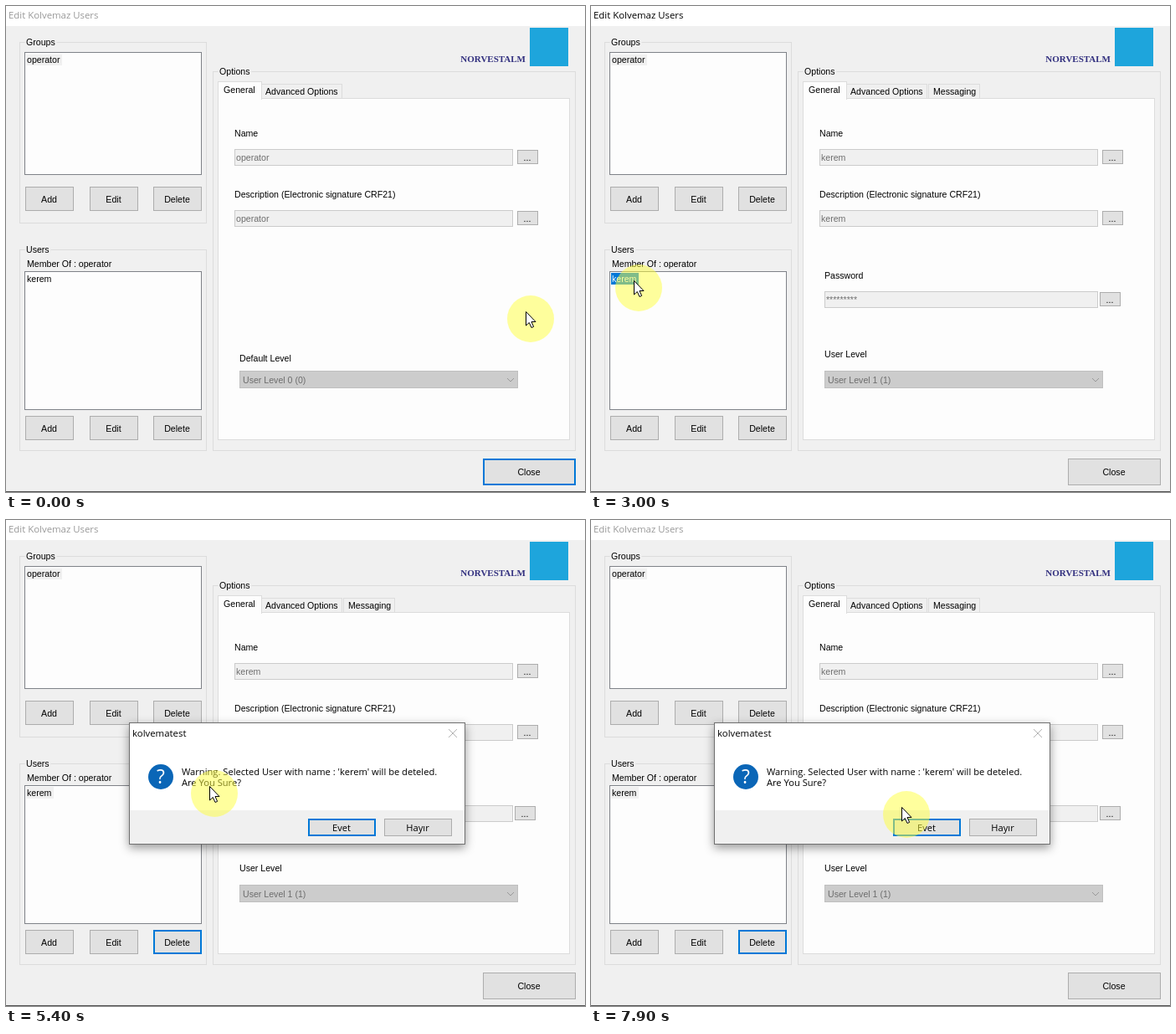
An HTML page that plays this animation: 692x581 px, repeating every 8 s.

```html
<!DOCTYPE html>
<html lang="en">
<head>
<meta charset="utf-8">
<title>Edit Users</title>
<style>
html, body { margin: 0; width: 100%; height: 100%; overflow: hidden; background: #f0f0f0; }
svg { display: block; font: 10.6px "Liberation Sans", Arial, sans-serif; }
text { white-space: pre; }
.ui { font: 11.15px "Open Sans", "Noto Sans", sans-serif; }
.caption { font-size: 11.4px; }
.icon { font-size: 23px; }
.legend { paint-order: stroke; stroke: #f0f0f0; stroke-width: 4px; }
#brand { font: bold 11px "Liberation Serif", serif; }
#dialog { filter: drop-shadow(0 4px 6px rgba(0, 0, 0, .4)); transform-origin: 348px 315px; }
</style>
</head>
<body>
<svg id="stage" width="692" height="581" viewBox="0 0 692 581"></svg>
<script>
const LOOP = 8000, STEP = 100;
const SELECT = 2500, PRESS = 4500, OPEN = 4700;
const BLUE = '#0078d7', GRAY = '#6d6d6d', FACE = '#f0f0f0', WHITE = '#fdfdfd', LINE = '#dcdcdc';
const USER = 'kerem';

// Pointer moves: eased from the last stop to (x, y), with a vertical bulge
const home = { x: 627, y: 374 };
const moves = [
  { from: 700, to: 1600, x: 115, y: 345, bulge: -102 },
  { from: 1600, to: 2100, x: 57, y: 337, bulge: 15 },
  { from: 3000, to: 3700, x: 198, y: 417, bulge: -6 },
  { from: 3700, to: 4300, x: 211, y: 510, bulge: 0 },
  { from: 4900, to: 5400, x: 249, y: 327, bulge: 0 },
  { from: 5400, to: 6500, x: 494, y: 305, bulge: -14 },
  { from: 6500, to: 7100, x: 231, y: 334, bulge: 0 },
  { from: 7100, to: 7500, x: 322, y: 338, bulge: 0 },
  { from: 7700, to: 7900, x: 377, y: 352, bulge: 0 }
];

const fill = (x, y, w, h, color, attrs = '') =>
  `<rect x="${x}" y="${y}" width="${w}" height="${h}" fill="${color}" ${attrs}/>`;
// The border lies inside the box.
const box = (x, y, w, h, color, stroke, line = 1) =>
  fill(x + line / 2, y + line / 2, w - line, h - line, color, `stroke="${stroke}" stroke-width="${line}"`);
const text = (x, y, s, color = '#000', attrs = '') => `<text x="${x}" y="${y}" fill="${color}" ${attrs}>${s}</text>`;
const group = (id, ...parts) => `<g id="${id}">${parts.join('')}</g>`;

const button = (x, y, w, h, label, focus, attrs = '') =>
  box(x, y, w, h, '#e1e1e1', focus ? BLUE : '#adadad', focus ? 2 : 1) +
  text(x + w / 2 - .5, Math.round(y + h / 2 + 4), label, '#000', `text-anchor="middle" ${attrs}`);
const rowButton = (i, y, label, focus) => button(Math.round(23 + i * 76.5), y, 58, 29, label, focus);
const frame = (x, y, w, h, label) =>
  box(x, y, w, h, 'none', LINE) + text(x + 8, y + 4, label, '#000', 'class="legend"');
const listPanel = (y, h, label, listY, listH, rowY) =>
  frame(16, y, 224, h, label) + box(22, listY, 212, listH, WHITE, '#7f8288') +
  ['Add', 'Edit', 'Delete'].map((s, i) => rowButton(i, rowY, s)).join('');
const tab = (x, w, label) => box(x, 93, w, 18, FACE, LINE) + text(x + 6, 106, label);
const entry = (x, y, label, value, moreX = 611) =>
  text(x, y, label) + box(x, y + 15, 606 - x, 20, FACE, '#cbcbcb') +
  text(x + 2, y + 29, value, GRAY) + button(moreX, y + 16, 25, 17, '...');
const level = (y, label, n) =>
  text(279, y, label) + box(279, 436, 333, 21, '#ccc', '#bfbfbf') +
  text(283, 451, `User Level ${n} (${n})`, GRAY) + '<path d="M599 445l4 4 4-4" fill="none" stroke="#999"/>';
const identity = name =>
  entry(273, 156, 'Name', name) + entry(273, 229, 'Description (Electronic signature CRF21)', name);

document.getElementById('stage').innerHTML = [
  fill(0, 0, 692, 581, FACE), fill(0, 0, 692, 24, '#fff'),
  text(3, 15, 'Edit Kolvemaz Users', '#999', 'id="title" class="ui caption"'),
  fill(626, 26, 46, 46, '#1ea5dc'),
  text(621, 67, 'NORVESTALM', '#32307f', 'id="brand" text-anchor="end"'),

  listPanel(43, 217, 'Groups', 55, 147, 216),
  fill(24, 58, 43, 13, FACE), text(25, 68, 'operator'),
  listPanel(291, 241, 'Users', 317, 166, 490),
  text(25, 312, 'Member Of : operator'),
  fill(24, 319, 33, 14, WHITE, 'id="mark"'), text(25, 330, USER, '#000', 'id="item"'),
  group('focusDelete', rowButton(2, 490, 'Delete', true)),

  frame(247, 78, 434, 454, 'Options'),
  tab(304, 98, 'Advanced Options'), group('messaging', tab(403, 62, 'Messaging')),
  box(253, 110, 421, 409, WHITE, LINE),
  box(253, 90, 53, 22, WHITE, LINE), fill(254, 109, 51, 4, WHITE), text(260, 104, 'General'),
  group('groupView', identity('operator'), level(425, 'Default Level', 0)),
  group('userView', identity(USER), entry(279, 326, 'Password', '*********', 608), level(420, 'User Level', 1)),
  button(570, 541, 111, 32, 'Close'),
  group('focusClose', button(570, 541, 111, 32, 'Close', true)),
  fill(0, 580, 692, 1, '#555'),

  group('dialog',
    box(147, 242, 402, 146, '#fff', '#707070'), fill(148, 347, 400, 40, FACE),
    text(151, 259, 'kolvematest', '#000', 'class="ui caption"'),
    '<path d="M529 250l10 10m0-10l-10 10" stroke="#b4b4b4"/>',
    '<circle cx="185" cy="307" r="15" fill="#0a66b7"/>',
    text(185, 315, '?', '#fff', 'class="ui icon" text-anchor="middle"'),
    text(210, 305, `Warning. Selected User with name : '${USER}' will be deteled.`, '#000', 'class="ui"'),
    text(210, 318, 'Are You Sure?', '#000', 'class="ui"'),
    button(361, 357, 81, 21, 'Evet', true, 'class="ui"'),
    button(452, 357, 81, 21, 'Hayır', false, 'class="ui"')),

  group('pointer',
    '<circle r="28" fill="#ffff3c" fill-opacity=".5"/>',
    '<circle id="ring" cx="-6" cy="-9" fill="none" stroke="#785a28" stroke-width="3"/>',
    '<path d="M-5.5-8.5v16.5l3.8-3.5 2.7 6 2.6-1.1-2.6-5.9h5z" fill="#fff" stroke="#000"/>')
].join('');

const el = id => document.getElementById(id);
const show = (id, on) => el(id).style.display = on ? '' : 'none';
const clamp = k => Math.max(0, Math.min(1, k));
const ease = k => k * k * (3 - 2 * k);

function pointerAt(t) {
  let { x, y } = home;
  for (const m of moves) {
    const k = ease(clamp((t - m.from) / (m.to - m.from)));
    x += (m.x - x) * k;
    y += (m.y - y) * k + m.bulge * Math.sin(Math.PI * k);
  }
  return [Math.round(x), Math.round(y)];
}

function draw(t) {
  const chosen = t >= SELECT, pressed = t >= PRESS, open = t >= OPEN;
  const active = chosen && !open, lit = chosen && !pressed;
  el('title').setAttribute('fill', active ? '#000' : '#999');
  el('mark').setAttribute('fill', lit ? BLUE : pressed ? FACE : WHITE);
  el('item').setAttribute('fill', lit ? '#fff' : '#000');
  show('groupView', !chosen);
  show('focusClose', !chosen);
  show('userView', chosen);
  show('messaging', chosen);
  show('focusDelete', pressed);

  const fade = clamp(.4 + (t - OPEN) / 200);
  show('dialog', open);
  el('dialog').style.opacity = fade;
  el('dialog').style.transform = `scale(${.9 + fade * .1})`;

  const age = t - (pressed ? PRESS : SELECT);
  show('ring', age >= 0 && age < 400);
  el('ring').setAttribute('r', Math.max(0, 3 + age / 65));
  el('ring').setAttribute('opacity', .7 - age / 1500);
  el('pointer').setAttribute('transform', `translate(${pointerAt(t)})`);
}

const start = performance.now();
function tick() {
  const t = (performance.now() - start) % LOOP;
  draw(Math.floor(t / STEP) * STEP);
  requestAnimationFrame(tick);
}
tick();
</script>
</body>
</html>
```
